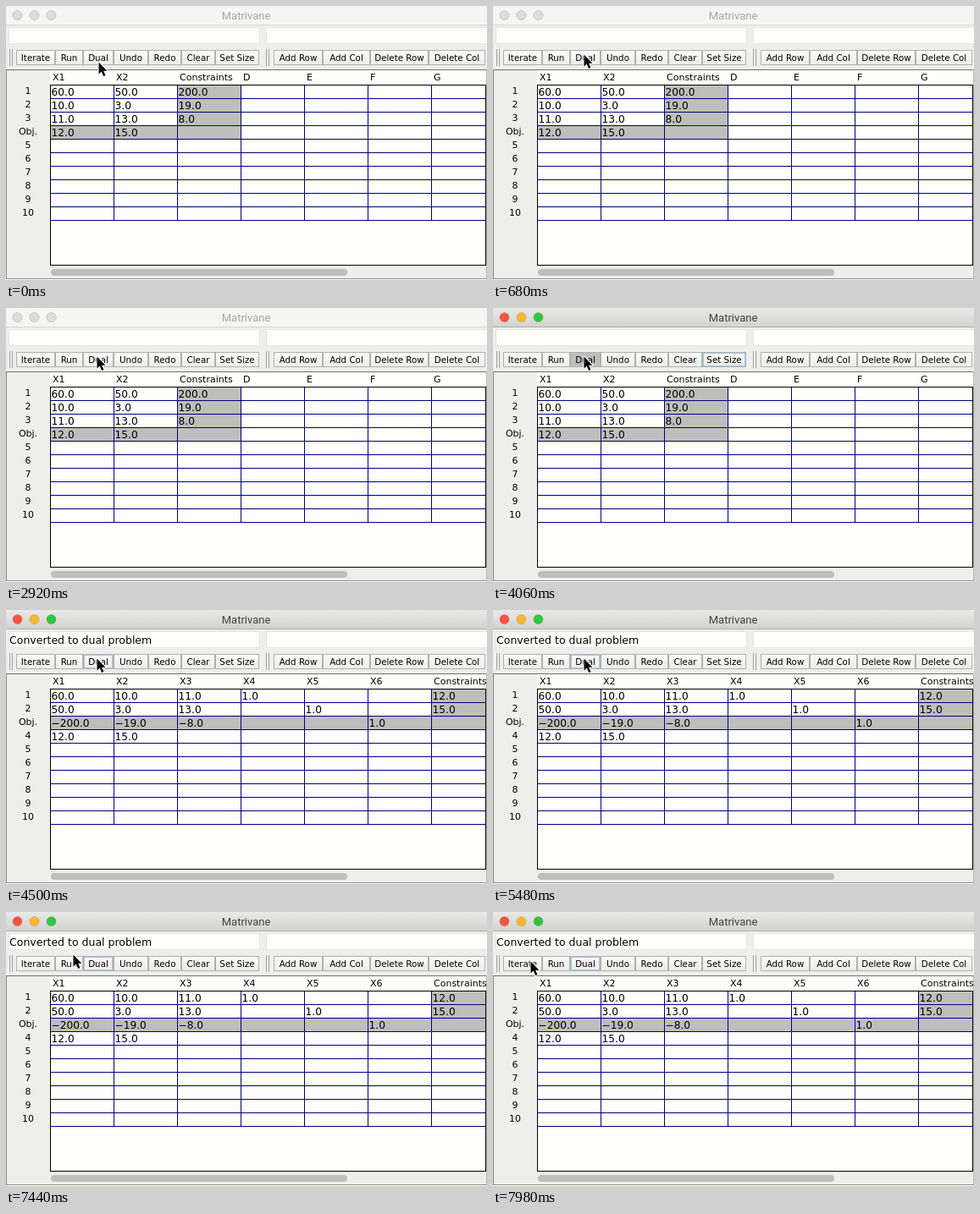
Animation of 568 by 324 pixels, one loop 8000 ms. Source, as an HTML page with a canvas:

```html
<!DOCTYPE html>
<html lang="en">
<head>
<meta charset="utf-8">
<title>Matrivane</title>
<style>
html, body { margin: 0; width: 100%; height: 100%; overflow: hidden; background: #eee; }
canvas { display: block; width: 568px; height: 324px; }
</style>
</head>
<body>
<canvas id="stage" width="568" height="324"></canvas>
<script>
const ctx = document.getElementById('stage').getContext('2d');
const W = 568, H = 324, LOOP = 8000;
const PRESS = 4040, FOCUS_MOVE = 4080, RELEASE = 4200;
const PANEL = '#eeeeec', PAPER = '#fefefc', SHADE = '#bebebc', EDGE = '#8c8c84', GRID = '#00007c';
const COL = 75, ROW = 16, LEFT = 52, TOP = 93, ROWS = 10;

// label, left edge, right edge
const buttons = [
  ['Iterate', 12, 57], ['Run', 58, 90], ['Dual', 91, 126], ['Undo', 127, 167],
  ['Redo', 168, 206], ['Clear', 207, 246], ['Set Size', 247, 298],
  ['Add Row', 316, 373], ['Add Col', 374, 429], ['Delete Row', 430, 498], ['Delete Col', 499, 565]
];

const primal = {
  headers: ['X1', 'X2', 'Constraints', 'D', 'E', 'F', 'G'],
  rows: [['60.0', '50.0', '200.0'], ['10.0', '3.0', '19.0'], ['11.0', '13.0', '8.0'], ['12.0', '15.0']],
  objective: 3, constraint: 2
};
const dual = {
  headers: ['X1', 'X2', 'X3', 'X4', 'X5', 'X6', 'Constraints'],
  rows: [
    ['60.0', '10.0', '11.0', '1.0', '', '', '12.0'],
    ['50.0', '3.0', '13.0', '', '1.0', '', '15.0'],
    ['−200.0', '−19.0', '−8.0', '', '', '1.0'],
    ['12.0', '15.0']
  ],
  objective: 2, constraint: 6
};

const progress = (t, from, to) => Math.min(1, Math.max(0, (t - from) / (to - from)));
const easeOut = k => 1 - (1 - k) ** 2;
const easeInOut = k => k * k * (3 - 2 * k);

function rect(x, y, w, h, fill) {
  ctx.fillStyle = fill;
  ctx.fillRect(x, y, w, h);
}

function frame(x, y, w, h, color) {
  ctx.strokeStyle = color;
  ctx.lineWidth = 1;
  ctx.strokeRect(x + .5, y + .5, w - 1, h - 1);
}

function shade(top, bottom, from, to) {
  const gradient = ctx.createLinearGradient(0, top, 0, bottom);
  gradient.addColorStop(0, from);
  gradient.addColorStop(1, to);
  return gradient;
}

function text(value, x, y, size, align = 'left', color = '#000', family = '"DejaVu Sans"') {
  ctx.font = `${size}px ${family}, sans-serif`;
  ctx.textAlign = align;
  ctx.fillStyle = color;
  ctx.fillText(value, x, y);
}

function drawTitle(active) {
  rect(0, 0, W, 22, active ? shade(0, 22, '#e9e9e7', '#d2d2d0') : '#f5f5f3');
  rect(0, 22, W, 1, active ? '#b0b0a8' : '#d6d6d0');
  ['#fc5444', '#fdb830', '#30c840'].forEach((color, i) => {
    ctx.beginPath();
    ctx.arc(13.5 + 20 * i, 11, 5.5, 0, 2 * Math.PI);
    ctx.fillStyle = active ? color : '#dcdcd8';
    ctx.fill();
    ctx.lineWidth = 1;
    ctx.strokeStyle = active ? 'rgba(110,50,0,.2)' : '#c8c8c4';
    ctx.stroke();
  });
  text('Matrivane', 283.5, 16, 13, 'center', active ? '#404040' : '#a4a4a0', 'Roboto');
}

function drawToolbar(t) {
  for (const [x, w] of [[3, 297], [307, 262]]) {
    rect(x, 25, w, 20, PAPER);
    frame(x, 25, w, 20, '#e4e4e0');
  }
  if (t >= RELEASE) text('Converted to dual problem', 4, 40, 12.5);

  for (const x of [4, 7, 307, 310]) rect(x, 51, 1, 20, '#a0a09c');
  const focused = t < PRESS ? '' : t < FOCUS_MOVE ? 'Set Size' : 'Dual';
  for (const [label, x, right] of buttons) {
    const pressed = label === 'Dual' && t >= PRESS && t < RELEASE;
    const w = right - x + 1;
    rect(x, 52, w, 18, pressed ? SHADE : shade(52, 70, '#fafaf8', '#ececea'));
    frame(x, 52, w, 18, '#b0b0ac');
    if (label === focused) frame(x + 1, 53, w - 2, 16, '#a8c8e0');
    text(label, x + w / 2, 65, 10.3, 'center');
  }
  rect(0, 75, W, 1, '#707068');
}

function drawTable({ headers, rows, objective, constraint }) {
  rect(LEFT, 76, W - LEFT, 231, PAPER);
  rect(LEFT, TOP + objective * ROW, (constraint + 1) * COL, ROW, SHADE);
  rect(LEFT + constraint * COL, TOP, COL, objective * ROW, SHADE);

  for (let r = 1; r <= ROWS; r++) rect(LEFT, TOP + r * ROW, 515, 1, GRID);
  for (let c = 1; c < 7; c++) rect(LEFT + c * COL, TOP, 1, ROWS * ROW + 1, GRID);
  frame(LEFT, TOP, 515, 214, '#000');

  ctx.save();
  ctx.beginPath();
  ctx.rect(0, 76, 567, 231);
  ctx.clip();
  headers.forEach((label, c) => text(label, 55 + c * COL, 88, 11));
  rows.forEach((row, r) => row.forEach((value, c) =>
    text(value, 53.5 + c * COL, 106 + r * ROW, 12.2)));
  for (let r = 0; r < ROWS; r++)
    text(r === objective ? 'Obj.' : r + 1, 26, 104 + r * ROW, 11, 'center');
  ctx.restore();
}

function drawEdges() {
  ctx.beginPath();
  ctx.roundRect(53, 311, 350, 8, 4);
  ctx.fillStyle = SHADE;
  ctx.fill();
  rect(0, 75, 1, 248, EDGE);
  rect(567, 75, 1, 248, '#b8b8b0');
  rect(0, 322, W, 1, EDGE);
  rect(0, 323, W, 1, PAPER);
}

// The pointer settles on Dual, rests, then swings in a shallow arc to Iterate.
function pointerAt(t) {
  const settle = easeOut(progress(t, 0, 500));
  const travel = easeInOut(progress(t, 6980, 7980));
  const lift = Math.sin(Math.PI * progress(t, 6980, 7720));
  return [109 - 2 * settle - 63 * travel, 66 - 9 * settle + travel - 8 * lift];
}

function drawPointer(t) {
  const [x, y] = pointerAt(t).map(Math.round);
  ctx.save();
  ctx.translate(x + .5, y + .5);
  const arrow = new Path2D('M0 0V14L3.2 11L5.6 16.5L8 15.4L5.6 10.2H10Z');
  ctx.lineWidth = 2;
  ctx.lineJoin = 'round';
  ctx.strokeStyle = '#fff';
  ctx.stroke(arrow);
  ctx.fillStyle = '#000';
  ctx.fill(arrow);
  ctx.restore();
}

function draw(now) {
  const t = now % LOOP;
  rect(0, 0, W, H, PANEL);
  drawTitle(t >= PRESS);
  drawToolbar(t);
  drawTable(t < RELEASE ? primal : dual);
  drawEdges();
  drawPointer(t);
}

const start = performance.now();
function tick() {
  draw(performance.now() - start);
  requestAnimationFrame(tick);
}
tick();
</script>
</body>
</html>
```
